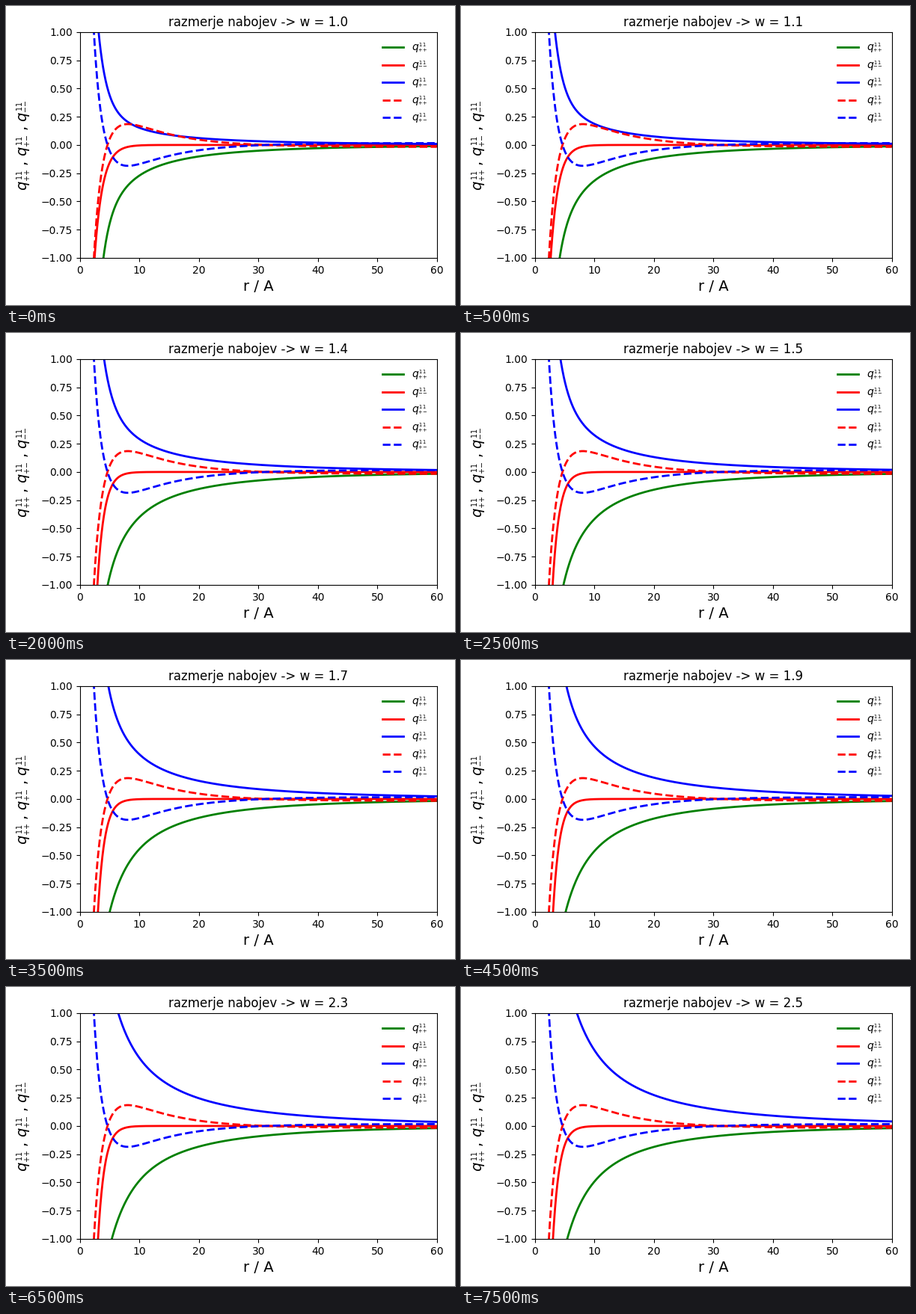
These frames come from a looping animation (600x400 px, 8 s). A matplotlib script:

```python
import numpy as np
import matplotlib.pyplot as plt
from matplotlib.animation import FuncAnimation

plt.rcParams["font.family"] = "DejaVu Sans"

FRAMES, INTERVAL = 16, 500
r = np.linspace(2.0, 60, 1500)


def q(signs):
    """Math label with a small 11 stacked over two signs."""
    a, b = signs
    return r"$q\genfrac{}{}{0}{2}{11}{%s{%s}}\!$" % (a, b)


def q_pp(w):
    far = (7.136 - 3.536 / w**2) * np.exp(-0.0285 * r) / r
    near = (0.072 - 0.146 / w**2) * np.exp(-0.9 * (r - 5))
    return near - far


def q_mm(w):
    edge = 3.06 - 2.25 * (1 / w - 0.488) ** 2  # where the curve reaches -1
    rate = np.log(1 / 0.11) / (5.5 - edge)
    return -np.exp(-rate * (r - edge))


def q_pm(w):
    far = 4.29 * np.exp(-r / 48.5) / r
    near = 0.451 * np.exp(-0.77 * (r - 3.15))
    return (w - 0.57) * far + (1 - ((w - 1) / 1.2) ** 2) * near


def q_fixed():
    far = 0.064 * np.exp(-(r - 20) / 8.5) - 0.017
    near = 6.8 * np.exp(-0.46 * r) / np.sqrt(r)
    return far - near


fig, ax = plt.subplots(figsize=(6, 4), dpi=100)
fig.subplots_adjust(left=0.1645, right=0.9595, bottom=0.158, top=0.9125)

moving = [
    (q_pp, ax.plot([], [], "g-", lw=2, label=q("++"))[0]),
    (q_mm, ax.plot([], [], "r-", lw=2, label=q("--"))[0]),
    (q_pm, ax.plot([], [], "b-", lw=2, label=q("+-"))[0]),
]
ax.plot(r, q_fixed(), "r--", lw=2, label=q("++"))
ax.plot(r, -q_fixed(), "b--", lw=2, label=q("+-"))

ax.set_xlim(0, 60)
ax.set_ylim(-1, 1)
ax.set_xlabel("r / A", fontsize=14)
ax.set_ylabel(" , ".join(q(s) for s in ("++", "+-", "--")), fontsize=14)
ax.yaxis.set_label_coords(37 / 600, 0.535, transform=fig.transFigure)
ax.legend(loc="upper right", frameon=False, labelspacing=0.4)
title = ax.set_title("")


def update(i):
    w = 1 + i / 10
    for curve, line in moving:
        line.set_data(r, curve(w))
    title.set_text(f"razmerje nabojev -> w = {w:.1f}")
    return [line for _, line in moving] + [title]


anim = FuncAnimation(fig, update, frames=FRAMES, interval=INTERVAL,
                     repeat=True, repeat_delay=0, blit=False)
plt.show()
```
